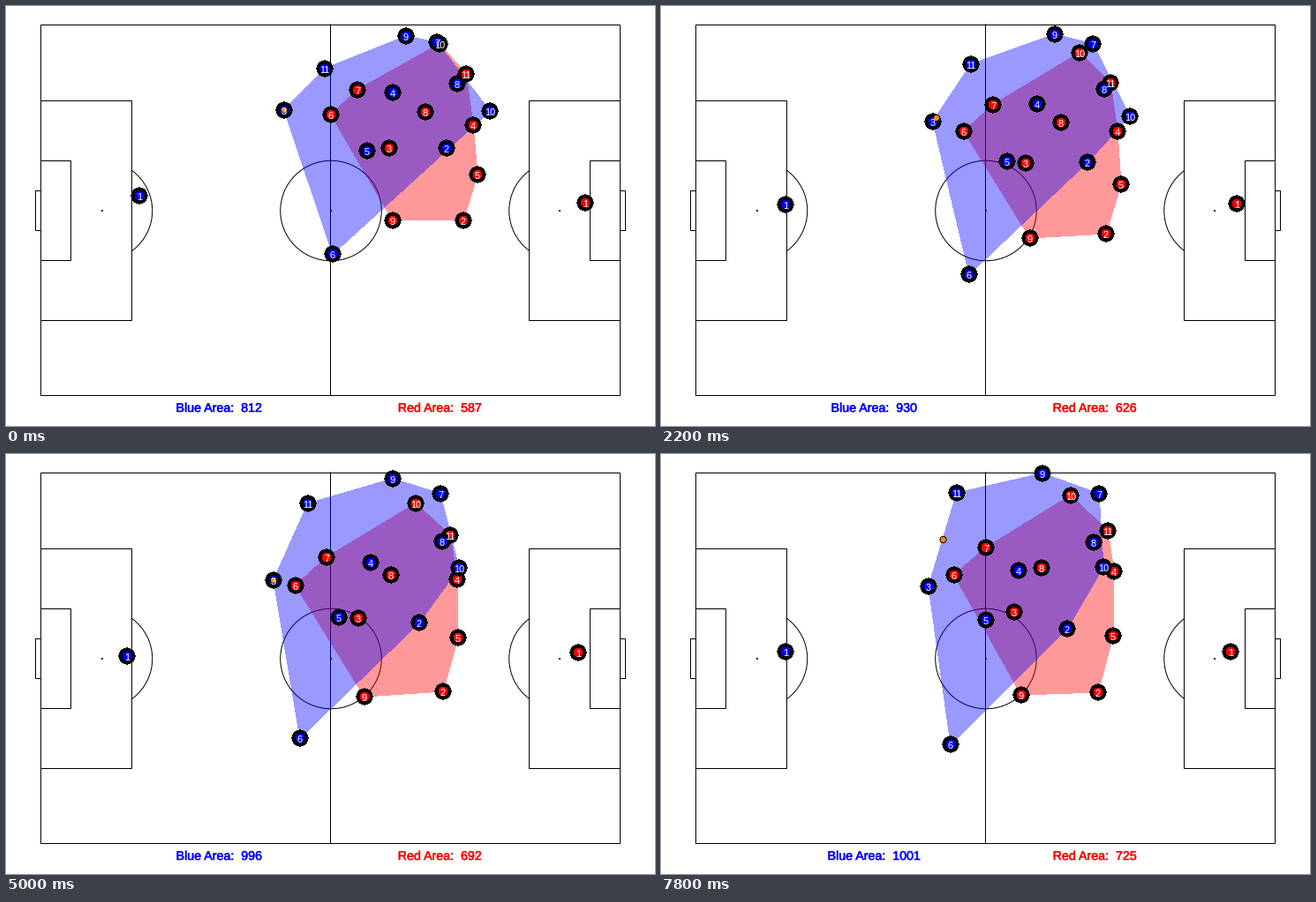
Animation, 735 px wide and 476 px high, one loop 8000 ms. Source, as a matplotlib script:

```python
import numpy as np
import matplotlib.pyplot as plt
from matplotlib.animation import FuncAnimation
from matplotlib.patches import Arc, Circle, Polygon, Rectangle
from matplotlib.patheffects import withStroke

W, H, DPI = 735, 476, 72
STEP, FRAMES = 200, 40
END = STEP * (FRAMES - 1)

# Per shirt number: start x, start y, and the way travelled by the end.
BLUE = [(151, 215, -10, 9), (499, 161, -39, 37), (315, 118, -12, 32),
        (438, 98, -33, 34), (409, 164, -41, 24), (370, 281, -42, 48),
        (488, 41, 8, 4), (511, 88, -21, 12), (453, 34, -21, -12),
        (548, 119, -47, 9), (361, 71, -26, -27)]
RED = [(656, 223, -11, 1), (518, 243, -23, 27), (434, 161, -34, 18),
       (529, 135, -16, -2), (534, 191, -22, 15), (368, 123, -36, 14),
       (398, 95, -30, 11), (475, 120, -44, 9), (438, 243, -30, 30),
       (491, 43, -27, 4), (521, 77, -15, 10)]

KICK, PASS_END = 6600, np.array([319.5, 97])
AREA_T = [0, 1400, 2200, 3400, 4200, 5800, 7800]


def hull(points):
    """Convex hull by monotone chain."""
    pts = sorted(map(tuple, points))

    def chain(seq):
        out = []
        for p in seq:
            while len(out) > 1:
                (x0, y0), (x1, y1) = out[-2:]
                if (x1 - x0) * (p[1] - y0) > (y1 - y0) * (p[0] - x0):
                    break
                out.pop()
            out.append(p)
        return out[:-1]

    return chain(pts) + chain(pts[::-1])


plt.rcParams["font.family"] = "Liberation Sans"
fig = plt.figure(figsize=(W / DPI, H / DPI), dpi=DPI, facecolor="white")
ax = fig.add_axes([0, 0, 1, 1])
ax.set_xlim(0, W)
ax.set_ylim(H, 0)
ax.axis("off")

INK = dict(color="black", lw=1, snap=False)


def box(x0, y0, x1, y1):
    ax.add_patch(Rectangle((x0 + 0.5, y0 + 0.5), x1 - x0, y1 - y0, fill=False,
                           joinstyle="miter", **INK))


def arc(x, start, end):
    ax.add_patch(Arc((x, 232), 114.5, 113.5, theta1=start, theta2=end, **INK))


def draw_pitch():
    left, right = 39, 695
    box(left, 21, right, 441)
    ax.plot([367.5, 367.5], [21, 441], **INK)
    for depth, y0, y1 in [(103, 107, 356), (34, 175, 288), (-6, 209, 254)]:
        box(left, y0, left + depth, y1)
        box(right - depth, y0, right, y1)
    arc(368, 0, 360)
    arc(108.5, -53, 53)
    arc(627, 127, 233)
    for x in (108, 367, 626):
        ax.add_patch(Rectangle((x, 231), 2, 2, fc="black", ec="none"))


class Team:
    def __init__(self, name, color, rows, sway, areas, label_x, z):
        self.name, self.areas = name, areas
        rows = np.array(rows, float)
        self.start, self.travel = rows[:, :2], rows[:, 2:]
        # Everyone swings towards the lower left and back on the way.
        self.sway = np.outer(sway(*self.start.T), [-1, 1])
        self.zone = Polygon([(0, 0)] * 3, fc=color, ec="none", alpha=0.4,
                            antialiased=False, zorder=z)
        ax.add_patch(self.zone)
        self.discs = [ax.add_patch(Circle((0, 0), 7.5, fc=color, ec="black", lw=3,
                                          antialiased=False, snap=False, zorder=z + 2))
                      for _ in rows]
        self.shirts = [ax.text(0, 0, str(n + 1), color="white", size=11, ha="center",
                               va="baseline", zorder=9) for n in range(len(rows))]
        self.label = ax.text(label_x, 460, "", color=color, size=14.25, ha="center",
                             va="baseline",
                             path_effects=[withStroke(linewidth=0.5, foreground=color)])

    def places(self, t):
        u = t / END
        return np.round(self.start + self.travel * u + self.sway * 4 * u * (1 - u))

    def update(self, t):
        pos = self.places(t)
        self.zone.set_xy(hull(pos[1:]))
        for disc, shirt, (x, y) in zip(self.discs, self.shirts, pos):
            disc.center = x, y
            shirt.set_position((x, y + 5))
        area = round(np.interp(t, AREA_T, self.areas))
        self.label.set_text(f"{self.name} Area:  {area}")


def ball_place(t):
    """Dribbled by blue 3, then passed forward."""
    held = min(t, KICK)
    nudge = 4.5 * max(0, np.sin(np.pi * held / 3400))
    feet = blue.places(held)[2] + [nudge, -nudge]
    return feet + (PASS_END - feet) * (t - held) / (END - KICK)


draw_pitch()
red = Team("Red", "#ff0000", RED, lambda x, y: 0.06 * (675 - x),
           [587, 608, 626, 661, 682, 702, 725], 491.5, 4)
blue = Team("Blue", "#0000ff", BLUE, lambda x, y: 0.04 * y,
            [812, 883, 930, 978, 996, 995, 1001], 241.5, 5)
ball = ax.add_patch(Circle((0, 0), 3.6, fc="#ff8c00", ec="black", lw=1, zorder=8))


def update(frame):
    t = frame * STEP
    red.update(t)
    blue.update(t)
    ball.center = ball_place(t)
    return []


anim = FuncAnimation(fig, update, frames=FRAMES, interval=STEP, repeat=True,
                     repeat_delay=0, init_func=lambda: update(0))
plt.show()
```
